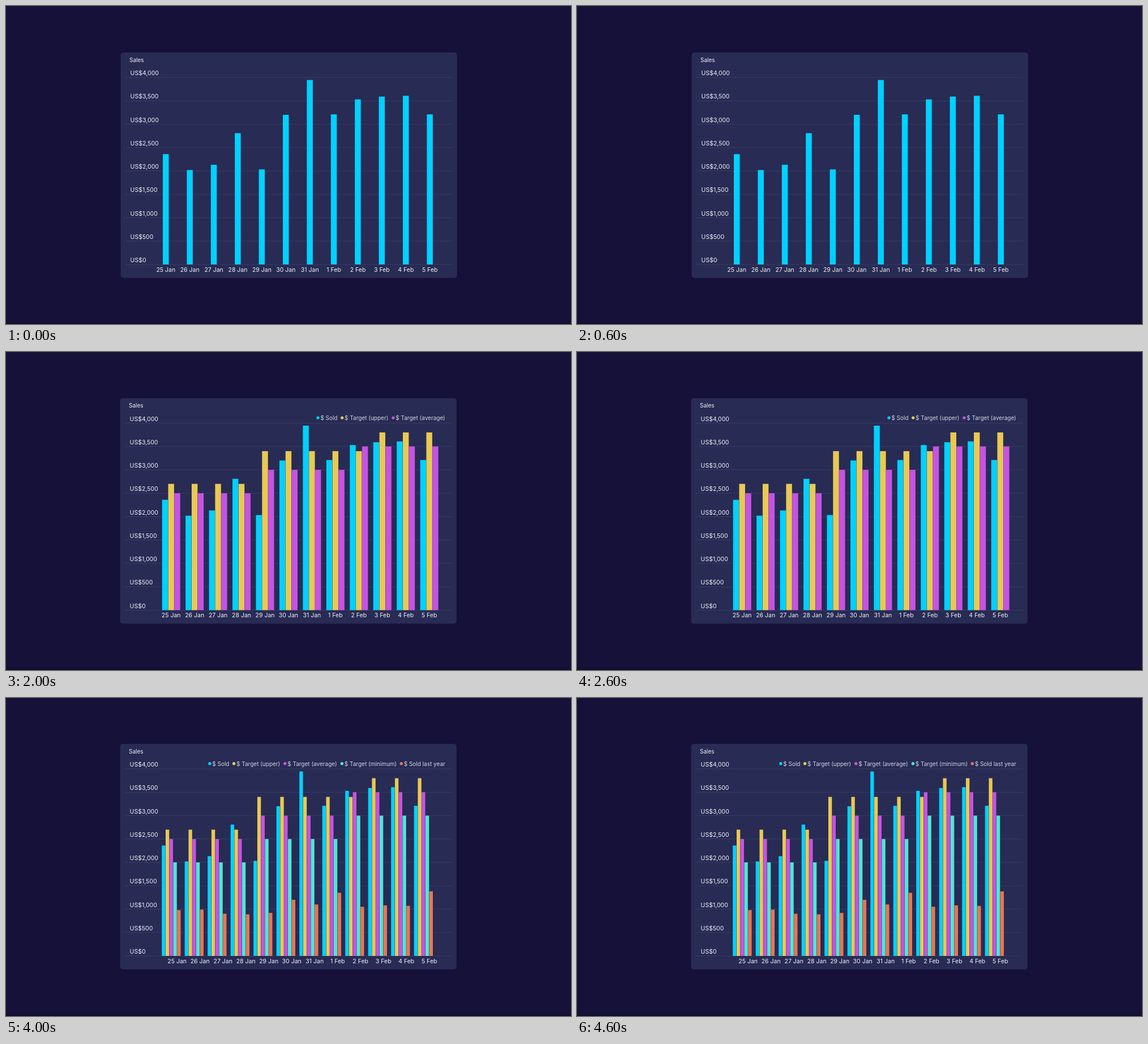
These frames come from a looping animation (998x561 px, 5000 ms). An HTML page:

```html
<!DOCTYPE html>
<html lang="en">
<head>
<meta charset="utf-8">
<title>Sales chart</title>
<style>
  html, body { margin: 0; width: 100%; height: 100%; overflow: hidden; background: #161138; }
  svg { display: block; width: 998px; height: 561px; font-family: Inter, Roboto, sans-serif; }
  .axis { font-size: 10.5px; fill: #f2f2f7; }
  .title { font-size: 10px; fill: #f2f2f7; }
  .key { font-size: 10px; fill: #d3d4df; }
</style>
</head>
<body>
<svg id="stage" viewBox="0 0 998 561"></svg>
<script>
const STEP_MS = 1000;
const UNIT = 0.0825; // pixels per dollar

const runs = (...pairs) => pairs.flatMap(([value, count]) => Array(count).fill(value));

// space: distance from this legend dot to the next one
const series = [
  { name: '$ Sold', color: '#00d1ff', space: 42.7,
    values: [2360, 2020, 2132, 2808, 2033, 3200, 3945, 3210, 3530, 3590, 3608, 3210] },
  { name: '$ Target (upper)', color: '#e8c954', space: 90.2,
    values: runs([2700, 4], [3400, 5], [3800, 3]) },
  { name: '$ Target (average)', color: '#c653e3', space: 100.6,
    values: runs([2500, 4], [3000, 4], [3500, 4]) },
  { name: '$ Target (minimum)', color: '#4de8d4', space: 104.9,
    values: runs([2000, 4], [2500, 4], [3000, 4]) },
  { name: '$ Sold last year', color: '#e87553', space: 86.2,
    values: [980, 990, 902, 890, 920, 1200, 1100, 1350, 1050, 1080, 1070, 1380] }
];

// One layout per number of visible series
const layouts = [
  { dx: 0,  base: 456,   first: 277,   pitch: 42.4,  step: 10.8, bar: 10.5, label: 282.3 },
  { dx: 0,  base: 455.4, first: 271.8, pitch: 42.4,  step: 10.8, bar: 10.4, label: 282.3 },
  { dx: -1, base: 455.4, first: 275.7, pitch: 41.45, step: 10.8, bar: 10.4, label: 291.7 },
  { dx: 0,  base: 455.4, first: 271.2, pitch: 41.47, step: 8.85, bar: 8.4,  label: 292.7 },
  { dx: -1, base: 455,   first: 275.2, pitch: 40.5,  step: 6.75, bar: 6.3,  label: 302.2 }
];

const days = Array.from({ length: 12 }, (_, i) => i < 7 ? `${25 + i} Jan` : `${i - 6} Feb`);

const rect = (x, y, w, h, fill, rx = 0) =>
  `<rect x="${x}" y="${y}" width="${w}" height="${h}" rx="${rx}" fill="${fill}"/>`;
const text = (x, y, str, cls, anchor = 'start') =>
  `<text x="${x}" y="${y}" class="${cls}" text-anchor="${anchor}">${str}</text>`;

function legend(shown, right, top) {
  let x = right + 8 - shown.reduce((sum, s) => sum + s.space, 0);
  return shown.map(s => {
    const item = `<circle cx="${x}" cy="${top - 9.3}" r="2.7" fill="${s.color}"/>` +
      text(x + 4.4, top - 5.2, s.name, 'key');
    x += s.space;
    return item;
  }).join('');
}

function chart(phase) {
  const { dx, base, first, pitch, step, bar, label } = layouts[phase];
  const shown = series.slice(0, phase + 1);
  const top = base - 4000 * UNIT;
  let out = rect(0, 0, 998, 561, '#161138') + rect(0, 560, 998, 1, '#07051a') +
    rect(202.5 + dx, base - 374, 594.3, 397.8, '#282b54', 5) +
    text(218 + dx, base - 357.5, 'Sales', 'title');

  for (let v = 0; v <= 4000; v += 500) {
    const y = base - v * UNIT;
    out += rect(211 + dx, y - 0.4, 577.5, 0.8, '#3e4062') +
      text(219.6 + dx, y - 3.9, 'US$' + v.toLocaleString('en-US'), 'axis');
  }

  shown.forEach((s, k) => s.values.forEach((v, i) => {
    out += rect(first + i * pitch + k * step, base - v * UNIT, bar, v * UNIT, s.color);
  }));
  days.forEach((day, i) => {
    out += text(label + i * pitch, base + 12.6, day, 'axis', 'middle');
  });
  return phase ? out + legend(shown, 777.5 + dx, top) : out;
}

const stage = document.getElementById('stage');
let current = -1;

function draw() {
  const phase = Math.floor(performance.now() / STEP_MS) % layouts.length;
  if (phase !== current) stage.innerHTML = chart(current = phase);
  requestAnimationFrame(draw);
}
draw();
</script>
</body>
</html>
```
